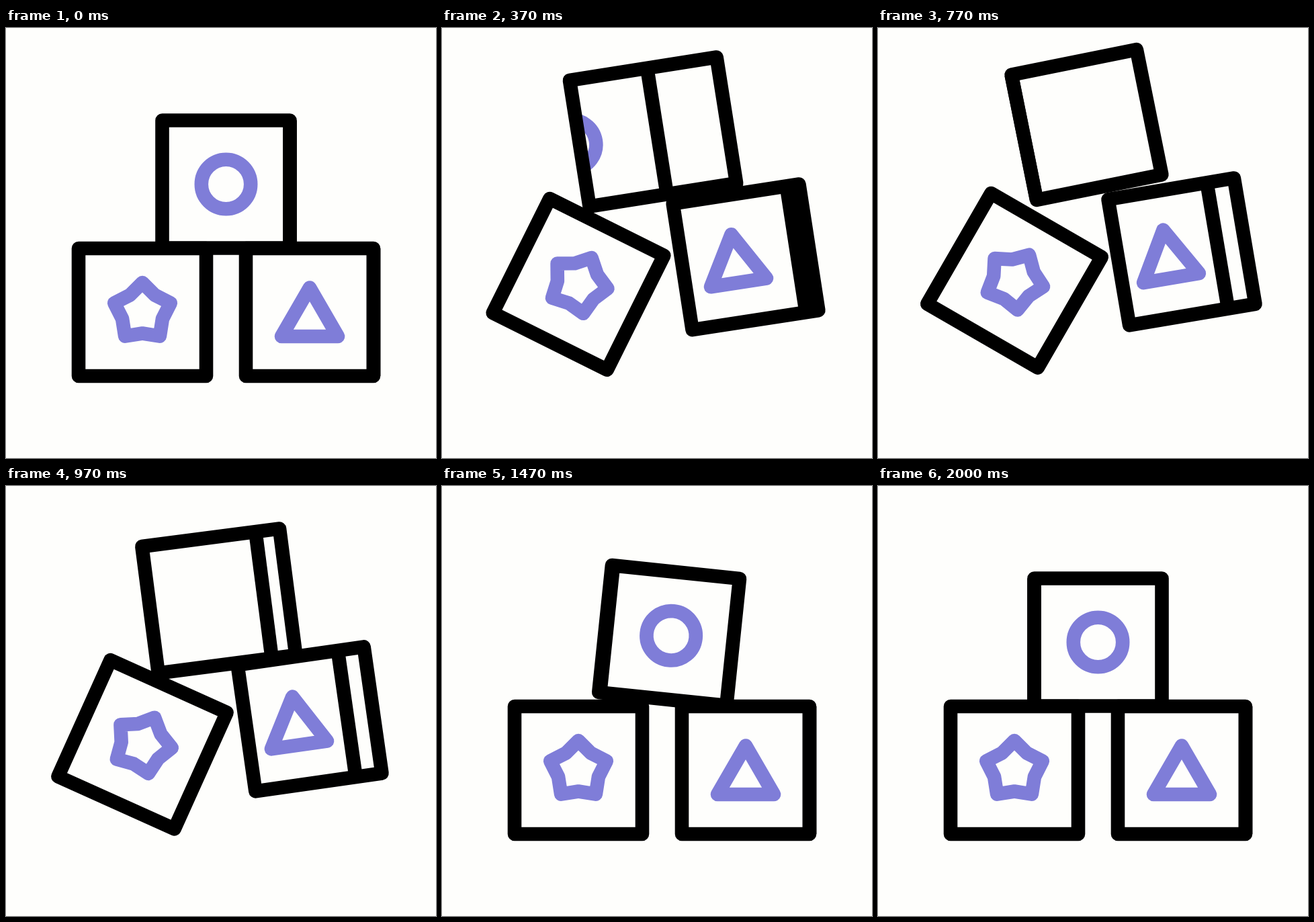
Write an HTML page with a canvas that moves like this. It is 640x640 px and loops after 2.03 s.

```html
<!DOCTYPE html>
<html lang="en">
<head>
<meta charset="utf-8">
<title>Toy blocks</title>
<style>
html, body { margin: 0; width: 100%; height: 100%; overflow: hidden; background: #fefefc; }
canvas { display: block; width: 100vw; height: 100vh; }
</style>
</head>
<body>
<canvas id="stage" width="640" height="640"></canvas>
<script>
const ctx = document.getElementById('stage').getContext('2d');
const LOOP = 2030, STEP = 1000 / 30;
const PAPER = '#fefefc', INK = '#000', SOFT = '#7f7dd8';
const SIDE = 190, HALF = SIDE / 2, LINE = 20.6;

const ramp = (f, a, b) => Math.min(1, Math.max(0, (f - a) / (b - a)));
const ease = (f, a, b) => {
  const t = ramp(f, a, b);
  return t * t * (3 - 2 * t);
};
// half linear, half eased
const soft = (f, a, b) => (ramp(f, a, b) + ease(f, a, b)) / 2;

function poly(points) {
  ctx.beginPath();
  points.forEach(([x, y]) => ctx.lineTo(x, y));
  ctx.closePath();
  ctx.stroke();
}

function star() {
  poly(Array.from({ length: 10 }, (_, i) => {
    const r = i % 2 ? 31.5 : 44, a = i * Math.PI / 5;
    return [r * Math.sin(a), -r * Math.cos(a)];
  }));
}

function triangle() {
  poly([[0, -36.5], [42, 36], [-42, 36]]);
}

function circle() {
  ctx.beginPath();
  ctx.arc(0, 0, 36.7, 0, Math.PI * 2);
  ctx.stroke();
}

// edge: x of the vertical edge between two faces, if one shows
function block({ x, y, deg, width = SIDE, edge = null, symbol, shift = 0 }) {
  const w = width / 2;
  ctx.save();
  ctx.translate(x, y);
  ctx.rotate(deg * Math.PI / 180);
  ctx.fillStyle = PAPER;
  ctx.fillRect(-w, -HALF, width, SIDE);

  ctx.save();
  ctx.beginPath();
  ctx.rect(-w, -HALF, width, SIDE);
  ctx.clip();
  ctx.translate(shift, 0);
  ctx.strokeStyle = SOFT;
  symbol();
  ctx.restore();

  ctx.strokeStyle = INK;
  ctx.strokeRect(-w, -HALF, width, SIDE);
  if (edge !== null) {
    ctx.beginPath();
    ctx.moveTo(edge, -HALF);
    ctx.lineTo(edge, HALF);
    ctx.stroke();
  }
  ctx.restore();
}

function topBlock(f) {
  const lift = ease(f, 0, 16.4), tip = ease(f, 20, 48), settle = ease(f, 48, 55.5);
  const second = f > 23;
  const turn = second ? soft(f, 24.6, 44.4) : soft(f, 0, 23);
  const width = SIDE + 31.5 * Math.sin(Math.PI * turn);
  block({
    x: 327.5 - 18 * lift + 30.3 * tip - 12.3 * settle,
    y: 232.5 - 103 * ease(f, 0, 16.2) + 93 * ease(f, 16, 44) + 10 * settle,
    deg: -12 * lift + 19 * tip - 7 * settle,
    width,
    edge: width * (0.5 - turn),
    symbol: circle,
    shift: second ? 282 * (1 - turn) : -260 * turn
  });
}

function leftBlock(f) {
  const up = ease(f, 0, 14) - soft(f, 24.3, 44);
  block({ x: 203, y: 423 - 47.2 * up, deg: 30 * up, symbol: star });
}

function rightBlock(f) {
  const up = ease(f, 0, 13.8) - ramp(f, 20, 42.7) ** 1.9;
  const back = ramp(f, 25, 44) ** 2;
  block({
    x: 452,
    y: 423 - 92 * up,
    deg: -9.8 * up,
    edge: HALF - 41 * (ease(f, 2, 21) - back),
    symbol: triangle,
    shift: -21.8 * (ease(f, 0, 16.5) - back)
  });
}

function draw(now) {
  const f = Math.floor((now % LOOP + 4) / STEP);
  ctx.fillStyle = PAPER;
  ctx.fillRect(0, 0, 640, 640);
  ctx.lineWidth = LINE;
  ctx.lineJoin = 'round';
  topBlock(f);
  leftBlock(f);
  rightBlock(f);
}

const start = performance.now();
function tick() {
  draw(performance.now() - start);
  requestAnimationFrame(tick);
}
tick();
</script>
</body>
</html>
```
